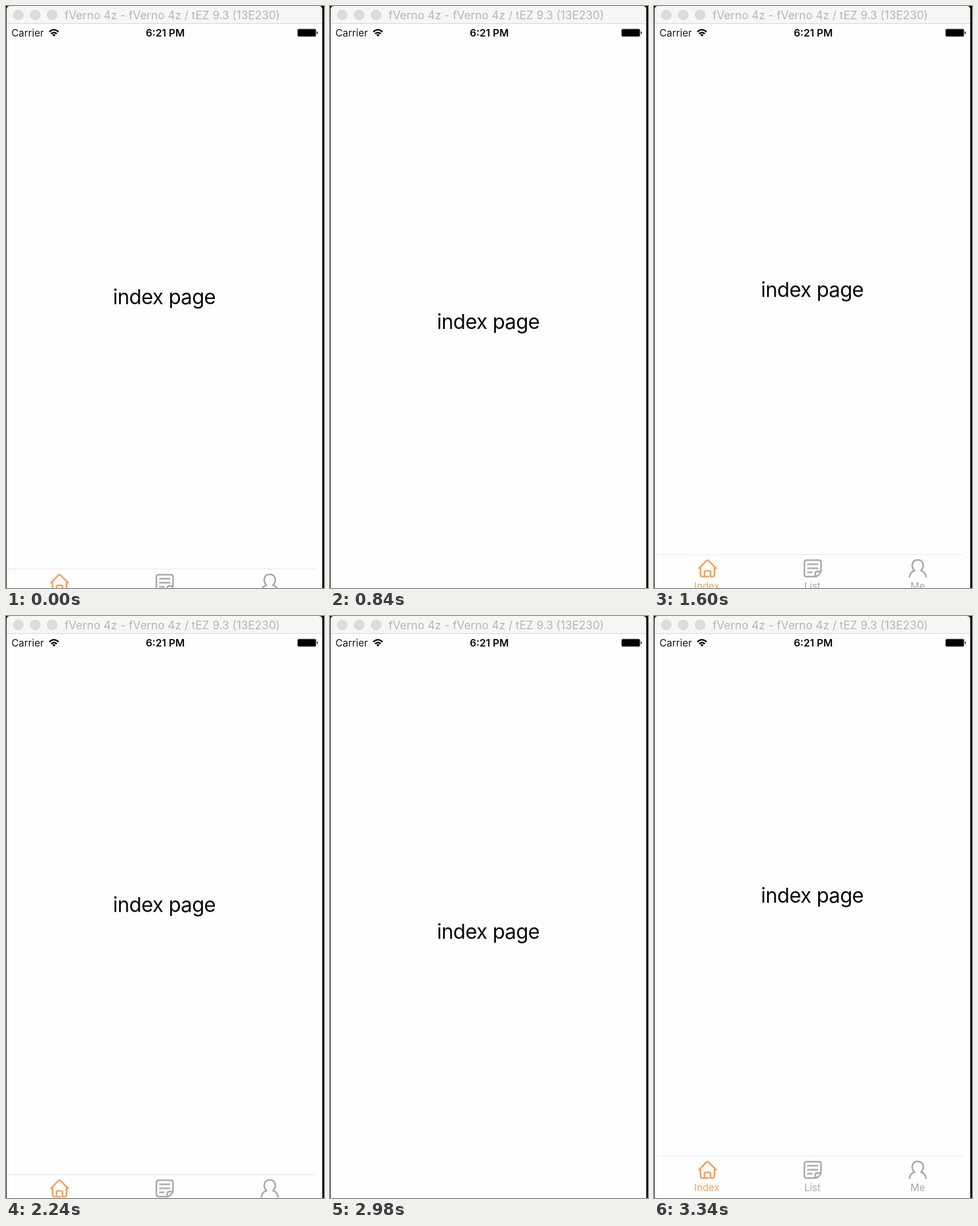
These frames come from a looping animation (554x1011 px, 3.36 s). An HTML page:

```html
<!DOCTYPE html>
<html lang="en">
<head>
<meta charset="utf-8">
<title>Tab bar toggle</title>
<style>
  html, body { margin: 0; width: 100%; height: 100%; overflow: hidden; background: #000; }
  svg { display: block; width: 554px; height: 1011px; font-family: Inter, Roboto, sans-serif; }
  .icon { fill: none; stroke: currentColor; stroke-width: 2.8; stroke-linecap: round; stroke-linejoin: round; }
  .tab { color: #a9a9a9; }
  .tab.on { color: #f5a05a; }
  .tab text { fill: currentColor; font-size: 17px; text-anchor: middle; }
</style>
</head>
<body>
<svg viewBox="0 0 554 1011">
  <rect x="1" y="20" width="550" height="991" fill="#fefefe"/>

  <g id="page">
    <text x="275.7" y="498" font-size="35.5" letter-spacing="-.6" text-anchor="middle" fill="#080808">index page</text>
  </g>

  <g id="bar">
    <rect x="1" y="938" width="550" height="74" fill="#fefefe"/>
    <path d="M3 938H539" stroke="#ececec" stroke-width="1.4"/>
    <g class="tab on">
      <g class="icon">
        <path d="M78.500 962L91 949Q93 947 95 949L108.500 962"/>
        <path d="M81 961V973Q81 976.500 84.500 976.500H95M105.500 961V973Q105.500 976.500 102 976.500H98.500V969Q98.500 966.500 96 966.500H90.500Q88 966.500 88 969V976"/>
      </g>
      <text x="92" y="999">Index</text>
    </g>
    <g class="tab">
      <g class="icon">
        <path d="M281 976.500H266Q262 976.500 262 972.500V952Q262 948 266 948H287Q291 948 291 952V967Q288 975 281 976.500V971Q281 967.500 285 967.500H290"/>
        <path d="M268 955H285M268 962H285M268 969H275"/>
      </g>
      <text x="276" y="999">List</text>
    </g>
    <g class="tab">
      <path class="icon" d="M445 977Q446 968.500 454 966C447 959 449 947.500 459.500 947.500S472 959 465 966Q473 968.500 474 977"/>
      <text x="459.500" y="999">Me</text>
    </g>
  </g>

  <path d="M1 31V6Q1 0 7 0H545Q551 0 551 6V31Z" fill="#f6f6f6"/>
  <path d="M1 30.500H551" stroke="#d2d2d2"/>
  <g fill="#dcdcdc" stroke="#d0d0d0">
    <circle cx="21.500" cy="15.500" r="8.500"/>
    <circle cx="50.800" cy="15.500" r="8.500"/>
    <circle cx="80.300" cy="15.500" r="8.500"/>
  </g>
  <text x="102" y="23" font-size="19.700" fill="#b6b6b6">fVerno 4z - fVerno 4z / tEZ 9.3 (13E230)</text>

  <text x="9.500" y="53" font-size="17.300" fill="#181818">Carrier</text>
  <g fill="none" stroke="#080808" stroke-width="2.600">
    <path d="M75.500 45Q83.500 37.500 91.500 45"/>
    <path d="M78.500 48.300Q83.500 43.800 88.500 48.300"/>
  </g>
  <path d="M80.500 50Q83.500 47.800 86.500 50L83.500 53Z" fill="#080808"/>
  <text x="277.500" y="53" font-size="17.800" font-weight="600" text-anchor="middle" fill="#080808">6:21 PM</text>
  <rect x="508" y="40" width="32" height="13" rx="2" fill="#000" stroke="#777"/>
  <path d="M541.500 44Q543.500 44.500 543.500 46.500T541.500 49Z" fill="#222"/>
</svg>
<script>
  const LOOP = 3360;
  const SLIDE = "cubic-bezier(.3,0,0,1)";

  // [time in ms, hidden amount 0..1, easing to the next step]
  const steps = [
    [0, .317, "linear"],
    [18, .317, "cubic-bezier(.15,.5,.3,1)"],
    [300, 0, "linear"],
    [624, 0, "ease-in-out"],
    [844, 1, "linear"],
    [1414, 1, SLIDE],
    [1774, 0, "linear"],
    [2180, 0, SLIDE],
    [2540, 1, "linear"],
    [2970, 1, SLIDE],
    [3330, 0, "linear"],
    [LOOP, 0, "linear"]
  ];

  function slide(id, distance) {
    const frames = steps.map(([time, hidden, easing]) => ({
      offset: time / LOOP,
      transform: `translateY(${hidden * distance}px)`,
      easing
    }));
    return document.getElementById(id).animate(frames, { duration: LOOP, iterations: Infinity });
  }

  // The page text stays centred, so it moves half as far as the bar.
  const moves = [slide("bar", 126), slide("page", 63)];
  const start = document.timeline.currentTime;
  moves.forEach(move => { move.startTime = start; });
</script>
</body>
</html>
```
